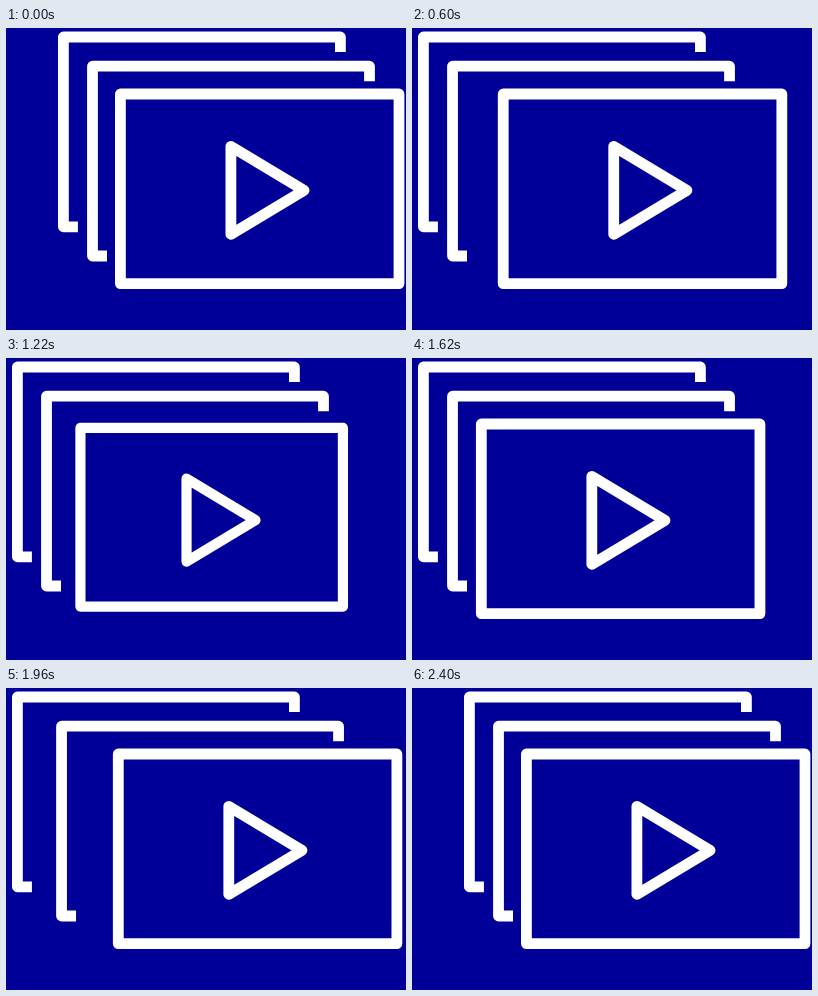
An HTML page with a canvas that plays this animation: 400 px wide and 302 px high, repeating every 3 s.

```html
<!DOCTYPE html>
<html lang="en">
<head>
<meta charset="utf-8">
<title>Video stack</title>
<style>
  html, body { margin: 0; width: 100%; height: 100%; overflow: hidden; background: #000099; }
  canvas { display: block; }
</style>
</head>
<body>
<canvas id="stage" width="400" height="302"></canvas>
<script>
const ctx = document.getElementById('stage').getContext('2d');
const LOOP = 3000;
const SLIDE = 46;

// Smooth progress from 0 to 1 between two times
function ease(t, start, end) {
  const u = Math.min(1, Math.max(0, (t - start) / (end - start)));
  return u * u * (3 - 2 * u);
}

function strokePath(points, closed) {
  ctx.beginPath();
  points.forEach(([x, y]) => ctx.lineTo(x, y));
  if (closed) ctx.closePath();
  ctx.stroke();
}

// Open outline of a card partly hidden behind the next one
function backCard(x, y) {
  strokePath([
    [x + 277, y + 15], [x + 277, y], [x, y],
    [x, y + 189.8], [x + 14.5, y + 189.8]
  ], false);
}

function scaled(cx, cy, dx, dy, scale, draw) {
  ctx.save();
  ctx.translate(cx + dx, cy + dy);
  ctx.scale(scale, scale);
  draw();
  ctx.restore();
}

function frontCard(shift, press) {
  const scale = 1 - 0.06 * press;
  scaled(253.7 + shift, 160.8, -2.1 * press, -1.6 * press, scale, () =>
    strokePath([[-139.3, -94.8], [139.3, -94.8], [139.3, 94.8], [-139.3, 94.8]], true));
  scaled(261.5 + shift, 162.3, -0.5 * press, -0.2 * press, scale, () =>
    strokePath([[-36.6, -44], [36.6, 0], [-36.6, 44]], true));
}

function render(t) {
  ctx.fillStyle = '#000099';
  ctx.fillRect(0, 0, 400, 302);
  ctx.strokeStyle = '#fff';
  ctx.lineWidth = 10.8;
  ctx.lineJoin = 'round';
  ctx.lineCap = 'butt';

  const back = ease(t, 0, 400) - ease(t, 2000, 2400);
  const middle = ease(t, 215, 605) - ease(t, 1808, 2208);
  const settle = 0.6 * ease(t, 1250, 1500);
  const out = ease(t, 400, 800);
  const home = ease(t, 1600, 2015);
  const press = ease(t, 1000, 1250) - ease(t, 1250, 1500);

  backCard(57.4 - SLIDE * back, 9);
  backCard(86.5 - SLIDE * middle, 38.2);
  frontCard((settle - SLIDE * out) * (1 - home), press);
}

const begin = performance.now();
function tick() {
  render((performance.now() - begin) % LOOP);
  requestAnimationFrame(tick);
}
tick();
</script>
</body>
</html>
```
